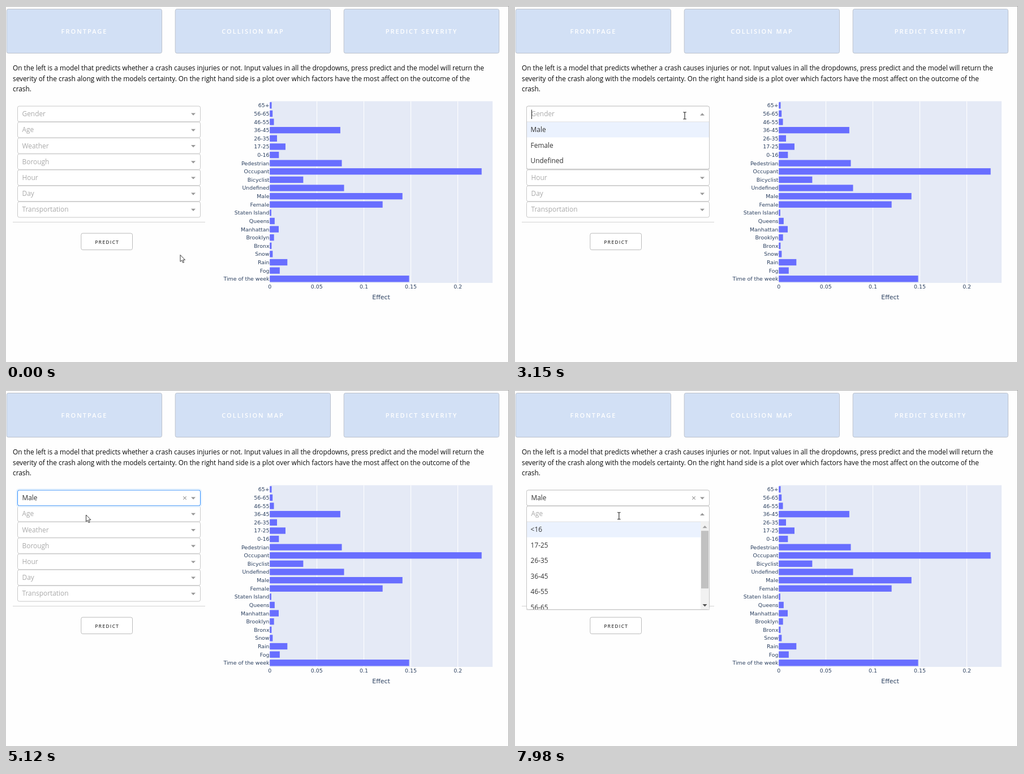
An HTML page for the animation above (8 s loop, 889x630 px).

```html
<!DOCTYPE html>
<html lang="en">
<head>
<meta charset="utf-8">
<title>Predict severity</title>
<style>
  html, body { margin: 0; width: 100%; height: 100%; overflow: hidden; background: #fefefe; }
  svg { display: block; width: 889px; height: 630px; }
  text { font: 11.9px "Open Sans", "Noto Sans", sans-serif; white-space: pre; }
  .para { font-size: 11.83px; fill: #0a0a0a; }
  .tab { font-size: 11px; font-weight: 600; letter-spacing: 2px; fill: #fff; }
  .btn { font-size: 8.7px; font-weight: 600; letter-spacing: 1.1px; fill: #4c4c4c; }
  .hint { fill: #aaa; }
  .value { fill: #333; }
  .tick { font: 9.4px "DejaVu Sans", Verdana, sans-serif; fill: #2a3f5f; }
  .title { font: 10.9px "DejaVu Sans", Verdana, sans-serif; fill: #2a3f5f; }
</style>
</head>
<body>
<svg id="stage" viewBox="0 0 889 630" xmlns="http://www.w3.org/2000/svg"></svg>
<script>
const LOOP = 8000, OPEN_GENDER = 3150, PICK = 4980, OPEN_AGE = 6380, BLINK = 530;
const ROW = 28.2, OPTION = 27.5;
const stage = document.getElementById('stage');

function add(parent, tag, attrs, content) {
  const el = document.createElementNS('http://www.w3.org/2000/svg', tag);
  for (const key in attrs) el.setAttribute(key, attrs[key]);
  if (content !== undefined) el.textContent = content;
  parent.appendChild(el);
  return el;
}
const group = parent => add(parent, 'g', {});
const rect = (g, x, y, width, height, fill, more) =>
  add(g, 'rect', { x, y, width, height, fill, ...more });
const text = (g, x, y, cls, str, anchor = 'start') =>
  add(g, 'text', { x, y, class: cls, 'text-anchor': anchor }, str);
const path = (g, d, more) => add(g, 'path', { d, ...more });
const show = (el, on) => { el.style.display = on ? '' : 'none'; };

function drawPage() {
  rect(stage, 0, 0, 889, 630, '#fefefe');
  ['FRONTPAGE', 'COLLISION MAP', 'PREDICT SEVERITY'].forEach((label, i) => {
    const x = 1 + i * 298;
    rect(stage, x + .2, 5.5, 274.3, 78, '#d2e0f5', { rx: 3, stroke: '#bbc1cc' });
    text(stage, x + 137.5, 49, 'tab', label, 'middle');
  });
  [
    'On the left is a model that predicts whether a crash causes injuries or not. Input values in all the dropdowns, press predict and the model will return the',
    'severity of the crash along with the models certainty. On the right hand side is a plot over which factors have the most affect on the outcome of the',
    'crash.'
  ].forEach((line, i) => text(stage, 12, 113.7 + i * 18.8, 'para', line));
  rect(stage, 12, 382, 340, 1, '#d3d3d3');
  rect(stage, 132.8, 402.2, 90.7, 29.3, '#fff', { rx: 3, stroke: '#bbb' });
  text(stage, 178.6, 420.5, 'btn', 'PREDICT', 'middle');
  rect(stage, 0, 0, 889, 1, '#b0b0b0');
  rect(stage, 888, 0, 1, 630, '#a8a8a8');
}

const EFFECTS = {
  '65+': .002, '56-65': .003, '46-55': .0044, '36-45': .075, '26-35': .0077, '17-25': .0167,
  '0-16': .0097, 'Pedestrian': .0766, 'Occupant': .2253, 'Bicyclist': .0356, 'Undefined': .079,
  'Male': .1411, 'Female': .12, 'Staten Island': .0016, 'Queens': .0052, 'Manhattan': .0095,
  'Brooklyn': .0045, 'Bronx': .0019, 'Snow': .0031, 'Rain': .0187, 'Fog': .0106,
  'Time of the week': .1482
};
function drawChart() {
  const left = 466.2, scale = 1662;
  rect(stage, 466, 168.5, 394, 321.5, '#e5eaf6');
  for (let i = 0; i < 5; i++) {
    const x = left + i * .05 * scale;
    rect(stage, Math.floor(x), 168.5, 1, 321.5, '#fff');
    text(stage, x, 500.3, 'tick', String(i * 5 / 100), 'middle');
  }
  Object.entries(EFFECTS).forEach(([label, value], i) => {
    const y = 175.8 + i * 14.615;
    rect(stage, left, y - 5.6, value * scale, 11.3, '#686eff');
    text(stage, 465.5, y + 3.5, 'tick', label, 'end');
  });
  text(stage, 663, 519.3, 'title', 'Effect', 'middle');
}

// Dropdowns
const rowTop = i => 177 + i * ROW;
const box = (g, i) =>
  rect(g, 20.5, rowTop(i) + .2, 323, 27.6, '#fff', { rx: 3, stroke: '#c8c8c8' });
function arrow(g, x, y, up, fill = '#999') {
  const s = up ? -1 : 1;
  path(g, `M${x - 4} ${y - 2 * s}h8l-4 ${4.2 * s}Z`, { fill });
}
function closedRow(i, label, cls = 'hint') {
  const g = group(stage);
  const frame = box(g, i);
  text(g, 28.5, rowTop(i) + 18.2, cls, label);
  arrow(g, 331, rowTop(i) + 14.6);
  return { g, frame };
}
function valueRow(label) {
  const row = closedRow(0, label, 'value');
  path(row.g, 'M313.3 188.4l5.4 5.4m0 -5.4l-5.4 5.4', { stroke: '#999', 'stroke-width': 1.1 });
  row.glow = rect(row.g, 18.9, 175.6, 326.2, 30.8, 'none', { rx: 4, stroke: '#e5f2ff', 'stroke-width': 2.2 });
  return row;
}
function openRow(i, label, options, bottom, scroll) {
  const g = group(stage);
  const top = rowTop(i), list = top + 28;
  const right = scroll ? 328 : 343;
  rect(g, 20, bottom - 2, 324, 2.6, '#ddd', { rx: 1.5 });
  rect(g, 20.5, top + .2, 323, bottom - top - .7, '#fff', { rx: 3, stroke: '#c4c4c4' });
  const mark = rect(g, 21, list, right - 21, OPTION, '#ebf2fe');
  rect(g, 21, list - .6, 322, 1, '#e2e2e2');
  text(g, 28.5, top + 18.2, 'hint', label);
  arrow(g, 331, top + 14.8, true);
  rect(add(g, 'clipPath', { id: 'list' + i }), 21, list, 322, bottom - list - 1);
  const items = add(g, 'g', { 'clip-path': `url(#list${i})` });
  options.forEach((o, k) => text(items, 27.6, list + 18.2 + k * OPTION, 'value', o));
  if (scroll) {
    rect(g, 328, list + .5, 15, bottom - list - 1.5, '#f1f1f1');
    rect(g, 329, list + 16, 13, 102, '#c1c1c1');
    arrow(g, 335.5, list + 9, true, '#a0a0a0');
    arrow(g, 335.5, bottom - 8, false, '#505050');
  }
  const caret = rect(g, 29, top + 6.5, 1, 16.5, '#222');
  return { g, mark, list, caret };
}

drawPage();
drawChart();
['Gender', 'Age', 'Weather', 'Borough', 'Hour', 'Day', 'Transportation']
  .forEach((label, i) => closedRow(i, label));
const picked = valueRow('Male');
const gender = openRow(0, 'Gender', ['Male', 'Female', 'Undefined'], 289, false);
const age = openRow(1, 'Age', ['<16', '17-25', '26-35', '36-45', '46-55', '56-65'], 389, true);

const pointer = group(stage);
path(pointer, 'M.5 .5V12.4L3.2 9.9 5.2 14.3 7.1 13.5 5.2 9.3H9Z',
  { fill: '#fff', stroke: '#222', 'stroke-width': .9, 'stroke-linejoin': 'round' });
const beam = group(stage);
path(beam, 'M-1 -5.3H1.1L1.8 -4.7 2.5 -5.3H4.6M1.8 -4.7V6.1M-1 6.7H1.1L1.8 6.1 2.5 6.7H4.6',
  { fill: 'none', stroke: '#222', 'stroke-width': 1.1 });

// Pointer strokes: each bends from the last end point towards `bend` and stops at `to`
const linear = k => k;
const smooth = k => k * k * (3 - 2 * k);
const out = power => k => 1 - (1 - k) ** power;
const START = [307.5, 440];
const STROKES = [
  { from: 1140, until: 1350, steps: 5, bend: [328, 424], to: [346.5, 421], ease: linear },
  { from: 1650, until: 2060, steps: 8, bend: [396, 295], to: [361, 207], ease: smooth },
  { from: 2460, until: 2870, steps: 8, bend: [335, 185], to: [298.2, 193.3], ease: out(1.3) },
  { from: 4100, until: 4600, steps: 10, bend: [181, 256], to: [141, 220.5], ease: out(2) },
  { from: 5610, until: 5900, steps: 6, bend: [161, 221], to: [182, 222], ease: smooth }
];

function pointerAt(t) {
  let pos = START;
  for (const { from, until, steps, bend, to, ease } of STROKES) {
    if (t < from) break;
    const step = 1 + Math.floor((t - from) / (until - from) * (steps - 1));
    const p = ease(Math.min(1, step / steps)), q = 1 - p;
    pos = pos.map((v, i) => q * q * v + 2 * q * p * bend[i] + p * p * to[i]);
  }
  return pos;
}
const blinkOn = (t, opened) => Math.floor((t - opened) / BLINK) % 2 === 0;

function render(t) {
  const [x, y] = pointerAt(t);
  const overInput = t < PICK ? x < 344 && y < gender.list : t >= OPEN_AGE;
  show(pointer, !overInput);
  show(beam, overInput);
  (overInput ? beam : pointer).setAttribute('transform', `translate(${x} ${y})`);

  show(gender.g, t >= OPEN_GENDER && t < PICK);
  show(gender.caret, blinkOn(t, OPEN_GENDER));
  const hover = Math.min(2, Math.max(0, Math.floor((y - gender.list) / OPTION)));
  gender.mark.setAttribute('y', gender.list + hover * OPTION);

  const focused = t >= PICK && t < OPEN_AGE;
  show(picked.g, t >= PICK);
  show(picked.glow, focused);
  picked.glow.setAttribute('opacity', Math.min(1, (1 + Math.floor((t - PICK) / 70)) / 3));
  picked.frame.setAttribute('stroke', focused ? '#3390ff' : '#c8c8c8');

  show(age.g, t >= OPEN_AGE);
  show(age.caret, blinkOn(t, OPEN_AGE));
}

const start = performance.now();
function tick() {
  render((performance.now() - start) % LOOP);
  requestAnimationFrame(tick);
}
tick();
</script>
</body>
</html>
```
